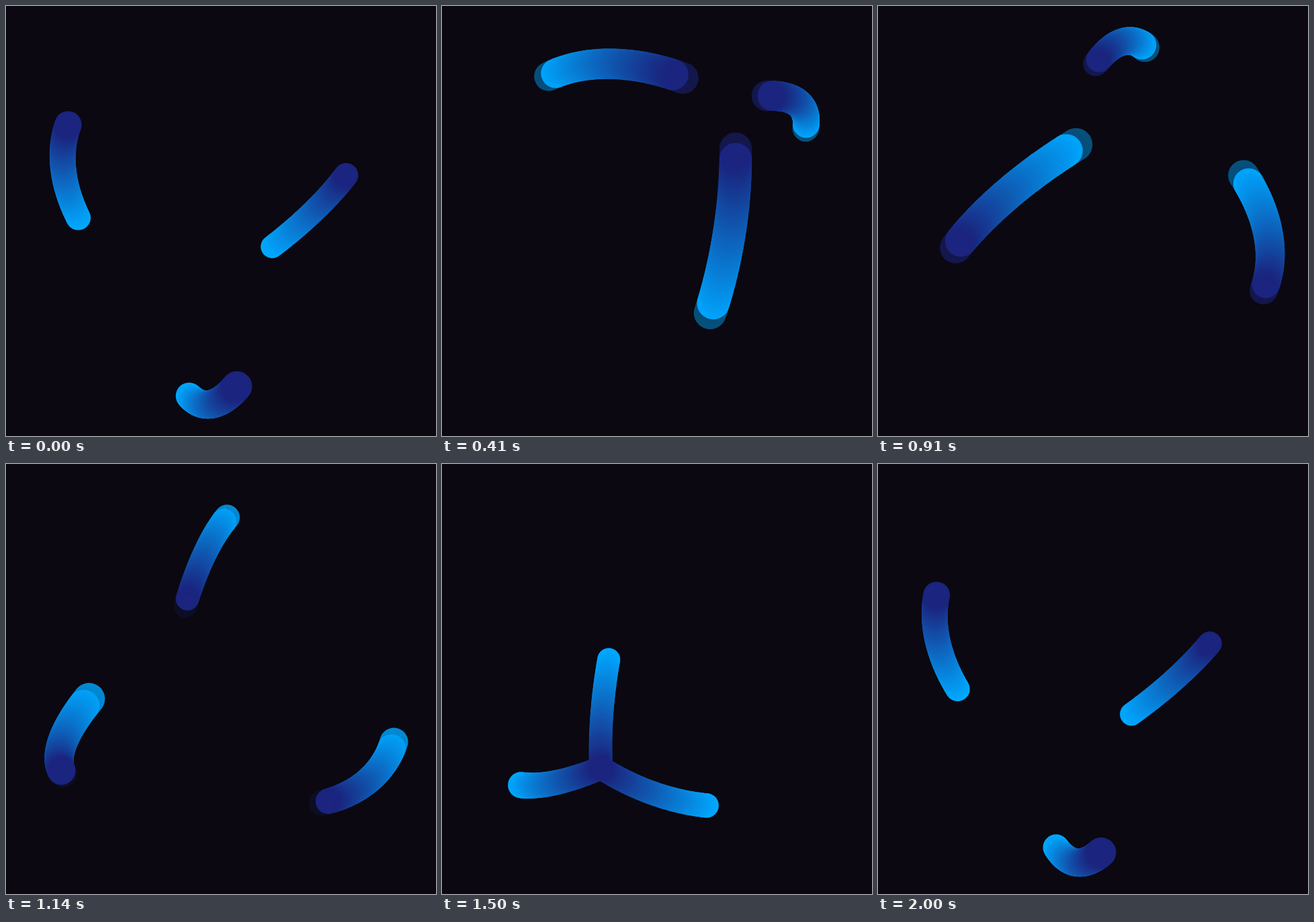
Write an HTML page with a canvas that moves like this. It is 640 by 640 pixels and loops after 2050 ms.

```html
<!DOCTYPE html>
<html lang="en">
<head>
<meta charset="utf-8">
<title>Three comets on a sphere</title>
<style>
  html, body { margin: 0; width: 100%; height: 100%; overflow: hidden; background: #0b0811; }
  canvas { display: block; width: 640px; height: 640px; }
</style>
</head>
<body>
<canvas id="stage" width="640" height="640"></canvas>
<script>
const SIZE = 640, LOOP = 2050;
const FPS = 22, STEPS = 45;            // visible steps per loop
const FINE_FPS = 60, LAST_FINE = 118;  // underlying motion, blended into the steps
const DEG = Math.PI / 180;

// Three great circles share one axis; their planes are 120 degrees apart.
const CENTER = 320, RADIUS = 269, FOCAL = 1400, DOT = 20.2;
const AXIS = [0.354, -0.5625, 0.7475];
const SIDE = [0.078, 0.814, 0.5755];
const CROSS = [-0.932, -0.1454, 0.332];
const ARMS = [0, 120, 240].map(d =>
  SIDE.map((s, i) => s * Math.cos(d * DEG) + CROSS[i] * Math.sin(d * DEG)));

const TRAIL = 42, DOTS = 42;           // trail length in degrees, dots per trail
const TAIL_COLOR = [0, 168, 255], HEAD_COLOR = [27, 36, 126];

const view = document.getElementById('stage').getContext('2d');
const layer = document.createElement('canvas');
layer.width = layer.height = SIZE;
const pen = layer.getContext('2d');

function mix(k) {
  return `rgb(${TAIL_COLOR.map((c, i) => Math.round(c + (HEAD_COLOR[i] - c) * k))})`;
}

function drawDot(arm, angle) {
  const c = Math.cos(angle), s = Math.sin(angle);
  const [x, y, z] = AXIS.map((a, i) => RADIUS * (a * c - arm[i] * s));
  const scale = FOCAL / (FOCAL - z);
  pen.beginPath();
  pen.arc(CENTER + x * scale, CENTER + y * scale, DOT * scale, 0, 2 * Math.PI);
  pen.fill();
}

function drawPose(fine) {
  pen.fillStyle = '#0b0811';
  pen.fillRect(0, 0, SIZE, SIZE);
  const head = -90 + fine * 3;
  for (let i = 0; i <= DOTS; i++) {
    const k = i / DOTS;
    pen.fillStyle = mix(k);
    for (const arm of ARMS) drawDot(arm, (head - TRAIL * (1 - k)) * DEG);
  }
}

function drawStep(step) {
  const fine = Math.min(step * FINE_FPS / FPS, LAST_FINE);
  const base = Math.floor(fine), part = fine - base;
  drawPose(base);
  view.globalAlpha = 1;
  view.drawImage(layer, 0, 0);
  if (part > 0.001) {
    drawPose(base + 1);
    view.globalAlpha = part;
    view.drawImage(layer, 0, 0);
  }
}

// Step starts fall on whole hundredths of a second.
const startOf = step => Math.round(step * 100 / FPS) * 10;

function stepAt(time) {
  let step = STEPS - 1;
  while (step > 0 && startOf(step) > time) step--;
  return step;
}

const begin = performance.now();
let shown = -1;

function tick() {
  const step = stepAt((performance.now() - begin) % LOOP);
  if (step !== shown) drawStep(shown = step);
  requestAnimationFrame(tick);
}
tick();
</script>
</body>
</html>
```
